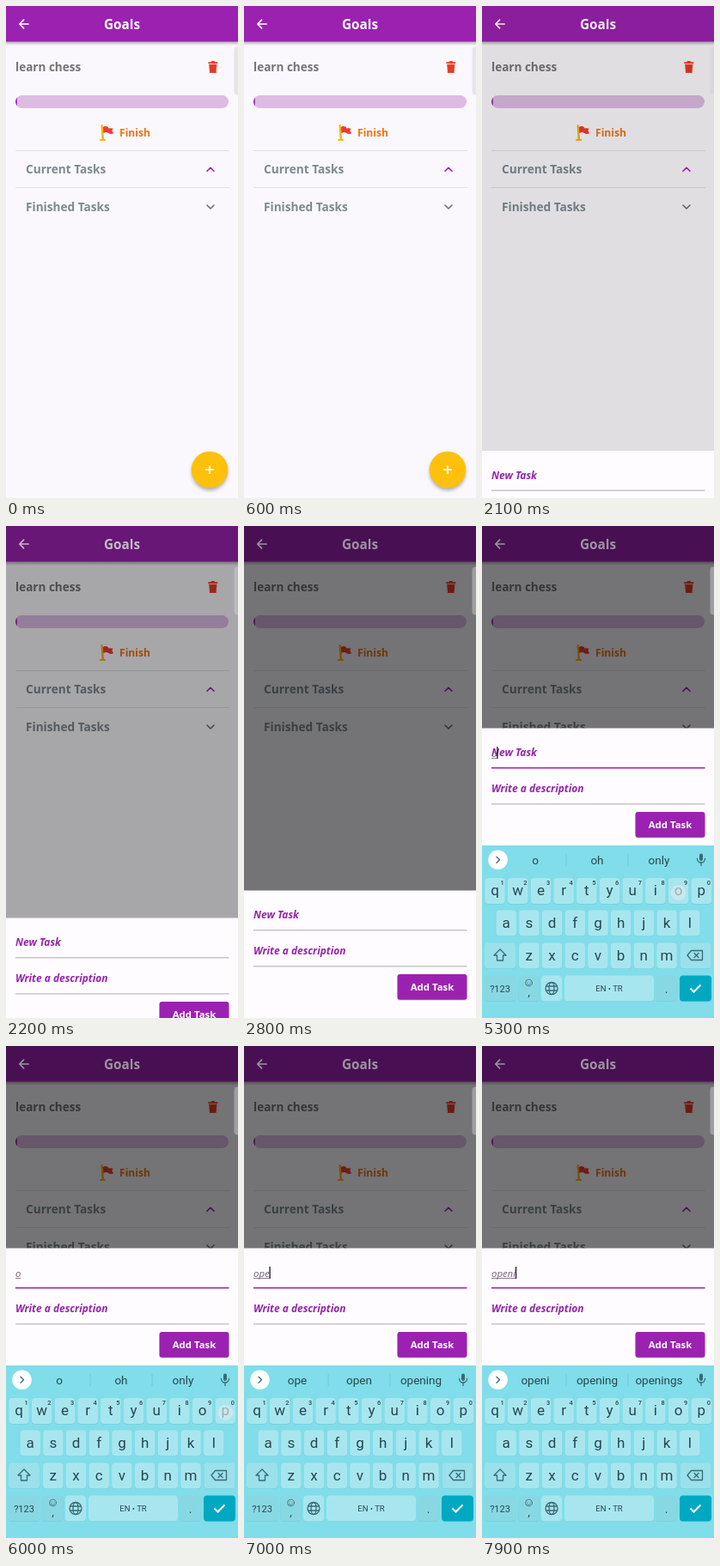
These frames come from a looping animation (270 by 573 pixels, 8 s). An HTML page:

```html
<!DOCTYPE html>
<html lang="en">
<head>
<meta charset="utf-8">
<title>Goals</title>
<style>
html, body { margin: 0; width: 100%; height: 100%; overflow: hidden; background: #faf8fc; }
svg { display: block; width: 100%; height: 100%; --d: 0%; }
text { font-family: "Open Sans", "Noto Sans", sans-serif; font-weight: 700; }
.mid { text-anchor: middle; }
.line { fill: none; stroke-linecap: round; stroke-linejoin: round; }
.title { fill: color-mix(in srgb, #fff, #9c92a0 var(--d)); }
.back { stroke: color-mix(in srgb, #fff, #9c92a0 var(--d)); stroke-width: 1.7; }
.section { font-size: 13.65px; fill: #7c8a90; }
.field { font-size: 11.95px; font-style: italic; fill: #9424a8; }
.typed { font-size: 11.4px; font-weight: 400; fill: #735a7c; }
#keyboard text { font-family: Roboto, "Noto Sans", sans-serif; font-weight: 400; fill: #27474f; text-anchor: middle; }
#keyboard .line { stroke: #3b6a74; stroke-width: 1.3; }
#keyboard .key { font-size: 17px; }
#keyboard .digit { font-size: 7.4px; font-weight: 500; }
#keyboard .word { font-size: 13.5px; }
#keyboard .gif { font-size: 10.5px; font-weight: 700; fill: #457680; letter-spacing: .4px; }
</style>
</head>
<body>
<svg id="stage" viewBox="0 0 270 573" preserveAspectRatio="none">
  <defs>
    <linearGradient id="shade" x2="0" y2="1">
      <stop stop-color="#000" stop-opacity=".32"/><stop offset="1" stop-color="#000" stop-opacity="0"/>
    </linearGradient>
    <filter id="soft" x="-30%" y="-30%" width="160%" height="160%"><feGaussianBlur stdDeviation="2"/></filter>
  </defs>

  <rect width="270" height="573" fill="#faf8fc"/>
  <rect y="41" width="270" height="5" fill="url(#shade)"/>
  <rect width="270" height="41.5" fill="#9b22b0"/>
  <text x="11" y="76" font-size="13.55" fill="#757475">learn chess</text>
  <path d="M235.3 65.3h3l1-1.3h3l1 1.3h3v2h-11zM236.2 68h9.2l-.8 10h-7.6z" fill="#f2402a"/>
  <path d="M238.8 69.5l.3 7M240.8 69.5v7M242.8 69.5l-.3 7" stroke="#b93a20" stroke-width=".7"/>
  <rect x="11" y="104" width="248" height="15" rx="7.5" fill="#ddbbe3"/>
  <path d="M12.8 106.700A7.500 7.500 0 0 0 12.8 116.300z" fill="#9b22b0"/>
  <path d="M110.5 138.5l2-.5 1.6 17h1.7v2h-6.5v-2h2.2z" fill="#fbb414"/>
  <path d="M112.8 141q3-2 6 0l.5 1.5q2.6-.8 5.2.2l-1.2 2.6 1.8 3q-3.4 1.6-6.3-.6-2.6-1.4-5.4.5z" fill="#ee3b35"/>
  <text x="132" y="152" font-size="12.1" fill="#ee7410">Finish</text>
  <path d="M11 168.5H260M11 211.5H260" stroke="#e1dfe3"/>
  <text x="23" y="195" class="section">Current Tasks</text>
  <text x="23" y="238.7" class="section">Finished Tasks</text>
  <path class="line" d="M234 192.3l4-4 4 4" stroke="#9b22b0" stroke-width="1.6"/>
  <path class="line" d="M234 232l4 4 4-4" stroke="#65727a" stroke-width="1.6"/>
  <circle cx="237" cy="543" r="21" fill="#000" opacity=".3" filter="url(#soft)"/>
  <circle cx="237" cy="540" r="21.3" fill="#fdc10c"/>
  <path d="M237 535v10M232 540h10" stroke="#fff" stroke-width="1.6"/>
  <rect id="shadow" width="270" height="573" opacity="0"/>

  <path class="line back" d="M26 21H16M20.6 16.2L15.8 21l4.8 4.8"/>
  <text x="135" y="26.5" class="mid title" font-size="15.3">Goals</text>
  <rect x="265.5" y="47.5" width="9" height="56" rx="4" fill="#d0d0d4" opacity=".47"/>

  <g id="sheet">
    <rect y=".5" width="270" height="160" fill="#fefcff"/>
    <text id="hint" class="field" x="11" y="33">New Task</text>
    <text id="typed" class="field typed" x="11" y="33.5"></text>
    <path id="underline" stroke="#735a7c" stroke-width=".8"/>
    <rect id="cursor" y="22" width="1.4" height="14" fill="#2b2030"/>
    <path id="rule" d="M11 46.8H259.5"/>
    <text class="field" x="11" y="75">Write a description</text>
    <path d="M11 88.8H259.5" stroke="#c9c5ca" stroke-width="1.4"/>
    <rect x="178.5" y="98.8" width="81" height="30" rx="3" fill="#000" opacity=".15"/>
    <rect x="178.5" y="98" width="81" height="29.7" rx="3" fill="#9b22b0"/>
    <text class="mid" x="219" y="117.3" font-size="11.4" fill="#fff">Add Task</text>
  </g>

  <g id="keyboard">
    <rect y="372" width="270" height="201" fill="#80dde9"/>
    <circle cx="18.5" cy="388.700" r="11.3" fill="#fefefe"/>
    <path id="toggle" class="line"/>
    <g id="tools">
      <path class="line" d="M48 383h11v7l-4 4h-7zM55 394v-4h4M51 386.500v.5M56 386.500v.5M51 389.500q2 2 4 0"/>
      <text class="gif" x="92" y="392.500">GIF</text>
      <path class="line" d="M125.500 384h9v10.500h-9zM128 384v-1.500h4v1.500M128 387.500h4M128 390.500h4"/>
      <circle class="line" cx="168" cy="388.700" r="3.200" style="stroke-width:2.600"/>
      <circle class="line" cx="168" cy="388.700" r="4.900" stroke-dasharray=".1 3.750" style="stroke-width:2.400"/>
      <path d="M193 382v14" stroke="#6bc5d1"/>
      <path class="line" d="M212 389h.1M216 389h.1M220 389h.1" style="stroke-width:2"/>
    </g>
    <g id="words">
      <path d="M98 382v14M170 382v14" stroke="#70ccd8"/>
      <text class="word" x="62" y="394"></text>
      <text class="word" x="134" y="394"></text>
      <text class="word" x="206" y="394"></text>
    </g>
    <rect x="253" y="381.500" width="4" height="8.500" rx="2" fill="#3b6a74"/>
    <path class="line" d="M250.500 387.500a4.500 4.500 0 0 0 9 0M255 392v3.500"/>
    <g id="keys"></g>
    <path class="line" d="M21 493l7 7h-3.500v6h-7v-6h-3.500z"/>
    <path class="line" d="M239 500l4.500-5.500h13v11h-13zM247 497.500l5 5M252 497.500l-5 5"/>
    <path class="line" d="M52.900 531v.3M56.100 531v.3M52.500 533.500q2 2 4 0" style="stroke-width:.8"/>
    <circle class="line" cx="54.500" cy="532" r="3.900" style="stroke-width:.8"/>
    <g class="line"><circle cx="81" cy="538.500" r="7"/><ellipse cx="81" cy="538.500" rx="3" ry="7"/><path d="M74.500 536h13M74.500 541h13"/></g>
    <path d="M242.500 538.500l4 4 8-8" fill="none" stroke="#fff" stroke-width="2"/>
    <circle id="press" r="9" fill="#d9eaee" opacity=".65"/>
  </g>
</svg>
<script>
const LOOP = 8000, STEP = 100;
const $ = id => document.getElementById(id);

// Tracks: [step, value] pairs, linear in between
const sheetTop = [[20, 573], [21, 517.5], [22, 456], [23, 431], [24, 424]];
const dimming = [[20, 0], [21, .2], [22, .62], [23, .9], [24, 1]];
const rising = [[41, 0], [42, 45], [43, 112], [44, 162.5], [45, 189], [46, 201]];
const hintFade = [[53, 1], [54, .4], [55, 0]];
const FOCUS = 41;
const strokes = [
  { at: 53, key: "o", words: ["o", "oh", "only"] },
  { at: 61, key: "p", words: ["op", "open", "opening"] },
  { at: 68, key: "e", words: ["ope", "open", "opening"] },
  { at: 76, key: "n", words: ["open", "opening", "opened"] },
  { at: 78, key: "i", words: ["openi", "opening", "openings"] }
];

function track(points, s) {
  if (s <= points[0][0]) return points[0][1];
  for (let i = 1; i < points.length; i++) {
    const [a, from] = points[i - 1], [b, to] = points[i];
    if (s <= b) return from + (to - from) * (s - a) / (b - a);
  }
  return points[points.length - 1][1];
}

function add(tag, attrs, label = "") {
  const node = document.createElementNS("http://www.w3.org/2000/svg", tag);
  for (const name in attrs) node.setAttribute(name, attrs[name]);
  node.textContent = label;
  $("keys").append(node);
}

function cap(cx, cy, width, fill = "#a8e6ef") {
  const box = { x: cx - width / 2, width, height: 30, rx: 4 };
  add("rect", { ...box, y: cy - 14.4, fill: "#6ccad6" });
  add("rect", { ...box, y: cy - 15, fill });
}

const places = {};
[["qwertyuiop", 15, 425], ["asdfghjkl", 28.2, 462.5], ["zxcvbnm", 54.8, 500.5]].forEach(([row, x0, y]) =>
  [...row].forEach((letter, i) => {
    const x = x0 + 26.7 * i;
    places[letter] = [x, y];
    cap(x, y, 23.5);
    add("text", { x, y: y + 5, class: "key" }, letter);
    if (row.length === 10) add("text", { x: x + 8.6, y: y - 7.5, class: "digit" }, (i + 1) % 10);
  }));

const pale = "#9ae1eb", muted = "#88d8e3";
cap(21, 500.5, 36, pale);
cap(248.5, 500.5, 36, pale);
cap(21, 538.5, 36, muted);
cap(54.5, 538.5, 24, muted);
cap(81, 538.5, 24);
cap(148, 538.5, 104);
cap(214.5, 538.5, 23.5, muted);
cap(248.5, 538.5, 37, "#00a9c1");
add("text", { x: 21, y: 542.5, "font-size": 11 }, "?123");
add("text", { x: 54.5, y: 547, "font-size": 13 }, ",");
add("text", { x: 148, y: 542, "font-size": 9.5 }, "EN • TR");
add("text", { x: 214.5, y: 544, "font-size": 14 }, ".");

const words = $("words").querySelectorAll("text");
const show = (id, on) => $(id).style.display = on ? "" : "none";
const shift = (id, y) => $(id).setAttribute("transform", `translate(0 ${y})`);

function render(time) {
  const s = Math.floor((time + 5) % LOOP / STEP);
  const dim = track(dimming, s), rise = track(rising, s);
  const focused = s >= FOCUS;

  $("stage").style.setProperty("--d", dim * 100 + "%");
  $("shadow").setAttribute("opacity", dim * .535);
  shift("sheet", track(sheetTop, s) - Math.min(rise, 189));
  shift("keyboard", 201 - rise);

  $("rule").setAttribute("stroke", focused ? "#9b22b0" : "#c9c5ca");
  $("rule").setAttribute("stroke-width", 1.4);

  const done = strokes.filter(k => k.at <= s);
  const last = done[done.length - 1];
  $("typed").textContent = done.map(k => k.key).join("");
  const end = 11 + (last ? $("typed").getComputedTextLength() : 0);
  $("underline").setAttribute("d", `M11 35.500H${end}`);
  show("underline", last);
  $("hint").setAttribute("opacity", track(hintFade, s));

  const since = s - (last ? last.at : FOCUS);
  $("cursor").setAttribute("x", end - .2);
  show("cursor", focused && since % 10 < 5);

  show("tools", !last);
  show("words", last);
  $("toggle").setAttribute("d", last ? "M17 385.200l3.500 3.500-3.500 3.500" : "M20 385.200l-3.500 3.500 3.500 3.500");
  if (last) words.forEach((node, i) => node.textContent = last.words[i]);

  const pressed = strokes.find(k => Math.abs(s - k.at + .5) < 1);
  show("press", pressed);
  if (pressed) {
    const [x, y] = places[pressed.key];
    $("press").setAttribute("cx", x);
    $("press").setAttribute("cy", y + 2);
  }
}

const start = performance.now();
function tick() {
  render(performance.now() - start);
  requestAnimationFrame(tick);
}
tick();
</script>
</body>
</html>
```
